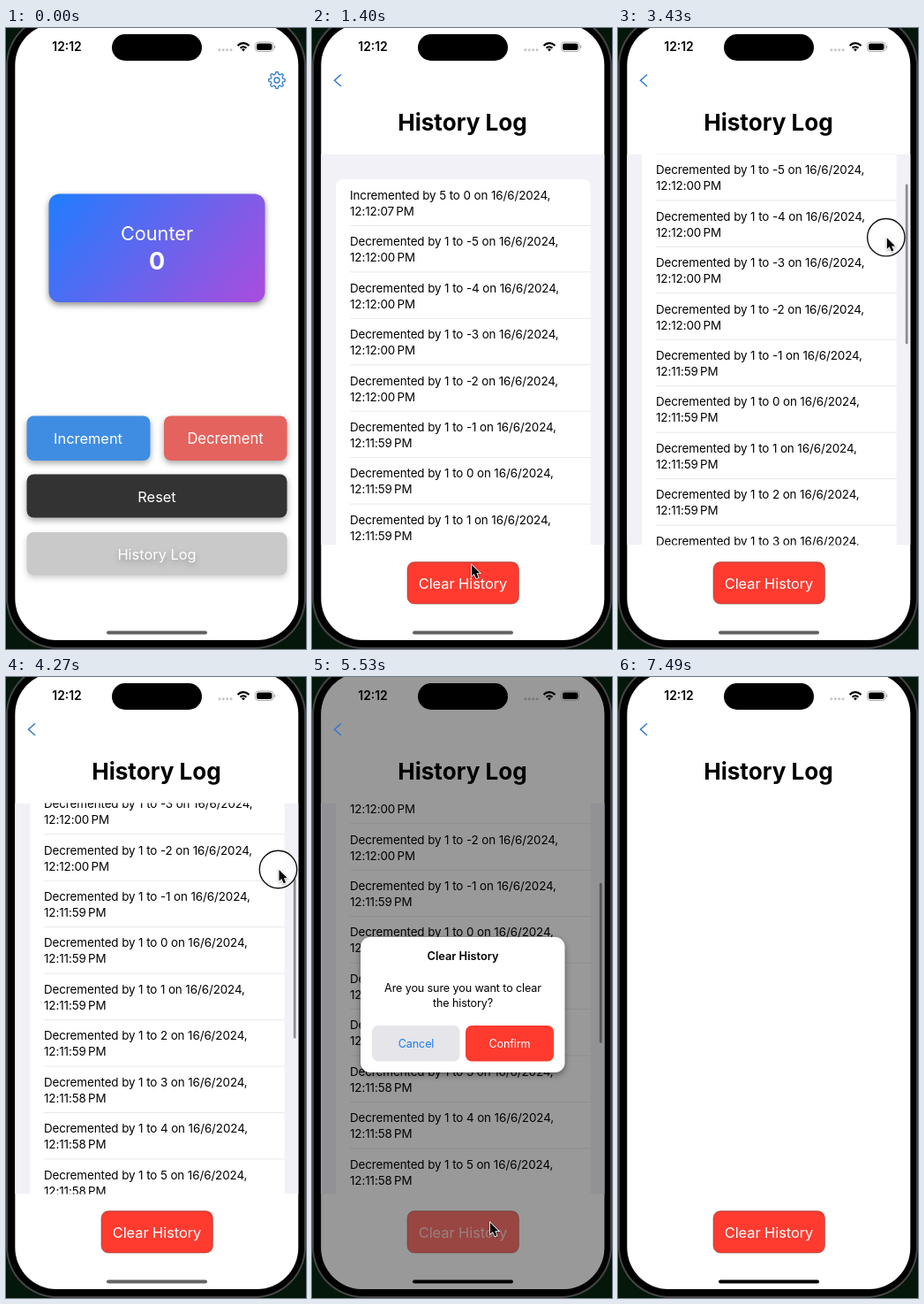
Write an HTML page with a canvas that moves like this. It is 340 by 702 pixels and loops after 8260 ms.

```html
<!DOCTYPE html>
<html lang="en">
<head>
<meta charset="utf-8">
<title>Counter and history log</title>
<style>
html, body { margin: 0; width: 100%; height: 100%; overflow: hidden; background: #04170a; }
canvas { display: block; width: 340px; height: 702px; }
</style>
</head>
<body>
<canvas id="stage"></canvas>
<script>
const W = 340, H = 702, LOOP = 8260, STEP = 70;
const canvas = document.getElementById('stage');
const c = canvas.getContext('2d');
const dpr = window.devicePixelRatio || 1;
canvas.width = W * dpr;
canvas.height = H * dpr;

const FONT = 'Inter, Roboto, sans-serif';
const LIST = { top: 142.5, bottom: 584.5, row: 52.45, count: 19 };

// Keys are [time, ...values]
const POINTER = [
  [70, 215, 540], [700, 181, 607], [2240, 181, 607], [2940, 300, 337],
  [3080, 300, 319], [3570, 306, 217], [3640, 306, 217], [3850, 308, 319],
  [4270, 309.5, 218], [4480, 309.5, 218], [5110, 202, 617], [5670, 202, 617],
  [6160, 237, 412], [6300, 241, 402], [7280, 241, 402], [7420, 203, 520]
];
const SCROLL = [[3080, 0], [3570, 101], [3850, 101], [4270, 203], [4410, 215]];

const clamp = v => Math.min(1, Math.max(0, v));
const ramp = (t, from, to) => clamp((t - from) / (to - from));
const during = (t, from, to) => t >= from && t < to;

function track(keys, t) {
  let i = keys.findIndex(k => k[0] > t);
  if (i < 0) return keys[keys.length - 1].slice(1);
  if (i === 0) return keys[0].slice(1);
  const a = keys[i - 1], b = keys[i], u = ramp(t, a[0], b[0]);
  const e = u * u * (3 - 2 * u);
  return a.slice(1).map((v, n) => v + (b[n + 1] - v) * e);
}

function group(draw, alpha = 1) {
  c.save();
  c.globalAlpha *= alpha;
  draw();
  c.restore();
}

function box(x, y, w, h, r, fill, shadow) {
  group(() => {
    if (shadow) {
      c.shadowColor = `rgba(0,0,0,${shadow})`;
      c.shadowBlur = 7 * dpr;
      c.shadowOffsetY = 3 * dpr;
    }
    c.fillStyle = fill;
    c.beginPath();
    c.roundRect(x, y, w, h, r);
    c.fill();
  });
}

function label(text, x, y, size, color, { weight = 400, align = 'center', track = 0 } = {}) {
  c.font = `${weight} ${size}px ${FONT}`;
  c.letterSpacing = track + 'px';
  c.textAlign = align;
  c.fillStyle = color;
  c.fillText(text, x, y);
}

function stroke(color, width, path) {
  c.strokeStyle = color;
  c.lineWidth = width;
  c.beginPath();
  path();
  c.stroke();
}

function dim(alpha) {
  c.fillStyle = `rgba(0,0,0,${alpha})`;
  c.fillRect(0, 0, W, H);
}

function home() {
  c.fillStyle = '#fff';
  c.fillRect(0, 0, W + 100, H);
  const g = c.createLinearGradient(64, 165, 278, 333);
  g.addColorStop(0, '#1f7dff');
  g.addColorStop(1, '#ac4cdc');
  box(48.5, 187.5, 245, 122.5, 12, g, 0.45);
  label('Counter', 171, 239.7, 21.7, '#fff');
  label('0', 171, 272.5, 27, '#fff', { weight: 700 });
  box(23.5, 438.5, 140, 50.5, 8, '#3f8de3', 0.35);
  label('Increment', 93, 470, 16.4, '#fff');
  box(179, 438.5, 139.5, 50.5, 8, '#e5635e', 0.35);
  label('Decrement', 248.5, 470, 16.6, '#fff');
  box(23.5, 504.5, 295, 49, 8, '#333', 0.35);
  label('Reset', 171, 535.5, 16.4, '#fff');
  box(23.5, 570, 295, 48.5, 8, '#c9c9c9', 0.2);
  group(() => {
    c.shadowColor = 'rgba(0,0,0,.3)';
    c.shadowBlur = 7 * dpr;
    c.shadowOffsetY = 3 * dpr;
    label('History Log', 171, 600.5, 16.4, '#fff');
  });
}

function list(offset, showBar) {
  const { top, bottom, row, count } = LIST;
  c.beginPath();
  c.rect(10, top, 322, bottom - top);
  c.clip();
  c.fillStyle = '#f2f1f7';
  c.fillRect(10, top, 322, bottom - top);
  const y0 = 171 - offset;
  box(27, y0, 288.5, row * count, 8, '#fff');
  for (let i = 0; i < count; i++) {
    const y = y0 + i * row, value = i - 6;
    const action = i ? `Decremented by 1 to ${value}` : 'Incremented by 5 to 0';
    const time = !i ? '12:12:07' : value < -1 ? '12:12:00' : value < 3 ? '12:11:59' : '12:11:58';
    const style = { align: 'left', track: -0.09 };
    label(`${action} on 16/6/2024,`, 43, y + 22.7, 13.4, '#000', style);
    label(`${time}\u2009PM`, 43, y + 40.7, 13.4, '#000', style);
    c.fillStyle = '#e6e6e9';
    c.fillRect(43, y + row - 0.5, 272.5, 0.9);
  }
  if (showBar) box(325.8, top + offset * 0.42, 2.8, 181, 1.4, '#8e8e92');
}

function clearButton() {
  box(108, 603.5, 126.5, 47.5, 8, '#ff3b30');
  stroke('rgba(110,70,60,.55)', 1, () => c.roundRect(108, 603.8, 126.3, 47.2, 8));
  label('Clear History', 171, 633.7, 16.4, '#fff', { track: -0.04 });
}

function historyPage(t) {
  const cleared = t >= 6790;
  const shade = cleared ? 0.4 * (1 - ramp(t, 6790, 7070)) : 0.4 * ramp(t, 5320, 5530);
  const pressed = t >= 5390 ? 0.4 + 0.6 * ramp(t, 5390, 5670) : 1;
  const offset = cleared ? 208 : track(SCROLL, t)[0];
  const content = () => {
    group(() => list(offset, during(t, 3150, 6790)), cleared ? 1 - ramp(t, 6790, 7000) : 1);
    group(clearButton, pressed);
  };
  c.fillStyle = '#fff';
  c.fillRect(10, 0, W, H);
  label('History Log', 170.5, 116.2, 26.1, '#000', { weight: 700 });
  if (!cleared) content();
  if (shade > 0) dim(shade);
  if (cleared) content();
}

function dialog() {
  box(55, 294, 231.5, 153, 11, '#fff', 0.4);
  const small = { track: -0.12 };
  label('Clear History', 171, 319.5, 12.8, '#000', { weight: 600 });
  label('Are you sure you want to clear', 171, 356, 12.6, '#000', small);
  label('the history?', 171, 373, 12.6, '#000', small);
  box(68, 394, 99.5, 40.5, 7, '#e5e5ea');
  label('Cancel', 118, 419, 12.6, '#1a7bf0', small);
  box(174, 394, 100, 40.5, 7, '#ff3b30');
  label('Confirm', 224, 419, 12.6, '#fff', small);
}

function gear() {
  stroke('#2f7cc9', 1.3, () => {
    for (let i = 0; i <= 96; i++) {
      const a = i / 96 * Math.PI * 2;
      const r = 8.1 + 1.2 * Math.tanh(3 * Math.cos(8 * a));
      c.lineTo(307 + r * Math.cos(a), 59 + r * Math.sin(a));
    }
    c.closePath();
    c.moveTo(310, 59);
    c.arc(307, 59, 3, 0, Math.PI * 2);
  });
}

function chevron() {
  stroke('#3279cb', 1.5, () => {
    c.moveTo(33, 52.5);
    c.lineTo(25.5, 59.3);
    c.lineTo(33, 66);
  });
}

function statusBar(t) {
  label('12:12', 69, 26.2, 13.9, '#000', { weight: 600 });
  box(120, 7, 102, 30, 15, '#000');
  const shaded = during(t, 5390, 6930);
  for (let i = 0; i < 4; i++) box(240.4 + i * 4.4, 23.3, 3, 3, 1.5, shaded ? '#777' : '#c6c6c8');
  for (const r of [4.7, 8.8]) {
    stroke('#000', 2.2, () => c.arc(269, 26, r, -Math.PI * 0.76, -Math.PI * 0.24));
  }
  c.fillStyle = '#000';
  c.beginPath();
  c.moveTo(269, 26.5);
  c.arc(269, 26, 2.6, -Math.PI * 0.76, -Math.PI * 0.24);
  c.fill();
  stroke(shaded ? '#777' : '#aaa', 1, () => c.roundRect(282.5, 16, 20.5, 10.5, 3.5));
  box(284, 17.5, 17.5, 7.5, 2.2, '#000');
  box(304, 19.5, 1.2, 3.6, 0.6, '#aaa');
  box(114, 681.5, 114, 4, 2, t < 5390 ? '#636363' : '#000');
}

function pointer(t) {
  if (t < 70 || t >= 7490) return;
  const [x, y] = track(POINTER, t);
  if (during(t, 3080, 3710) || during(t, 3850, 4410)) {
    c.beginPath();
    c.arc(x - 1, y - 0.5, 21.2, 0, Math.PI * 2);
    c.fillStyle = 'rgba(255,255,255,.75)';
    c.fill();
    c.strokeStyle = '#111';
    c.lineWidth = 1.4;
    c.stroke();
  }
  const arrow = new Path2D('M0 0V14L3.2 11.1L5.8 17L8.4 15.9L5.9 10.2H10.3Z');
  group(() => {
    c.translate(x, y);
    c.scale(0.9, 0.9);
    c.shadowColor = 'rgba(0,0,0,.35)';
    c.shadowBlur = 3 * dpr;
    c.shadowOffsetY = dpr;
    c.strokeStyle = '#fff';
    c.lineWidth = 1.8;
    c.stroke(arrow);
    c.shadowColor = 'transparent';
    c.fillStyle = '#000';
    c.fill(arrow);
  });
}

// Share of the push still to travel: a critically damped spring
function pushLeft(t) {
  if (t < 910) return 1;
  if (t >= 1400) return 0;
  const k = (t - 870) * 0.0205;
  return (1 + k) * Math.exp(-k);
}

function phone() {
  c.fillStyle = '#04170a';
  c.fillRect(0, 0, W, H);
  box(0, -15, 340, 717, 58, '#454547');
  box(2, -13, 336, 713, 56, '#000');
}

function draw(t) {
  c.setTransform(dpr, 0, 0, dpr, 0, 0);
  phone();
  group(() => {
    c.beginPath();
    c.roundRect(10.3, -5, 321, 697, 47);
    c.clip();
    const left = pushLeft(t);
    if (left > 0) {
      group(() => {
        c.translate(-96 * (1 - left), 0);
        home();
      });
      dim(0.1 * (1 - left));
    }
    if (left < 1) {
      group(() => {
        c.translate(321 * left, 0);
        historyPage(t);
      });
    }
    group(gear, left);
    group(chevron, 1 - left);
    if (during(t, 5390, 6790)) group(dialog, ramp(t, 5320, 5530));
    statusBar(t);
  });
  pointer(t);
}

const start = performance.now();
function tick() {
  const t = (performance.now() - start) % LOOP;
  draw(Math.floor(t / STEP) * STEP);
  requestAnimationFrame(tick);
}
tick();
</script>
</body>
</html>
```
